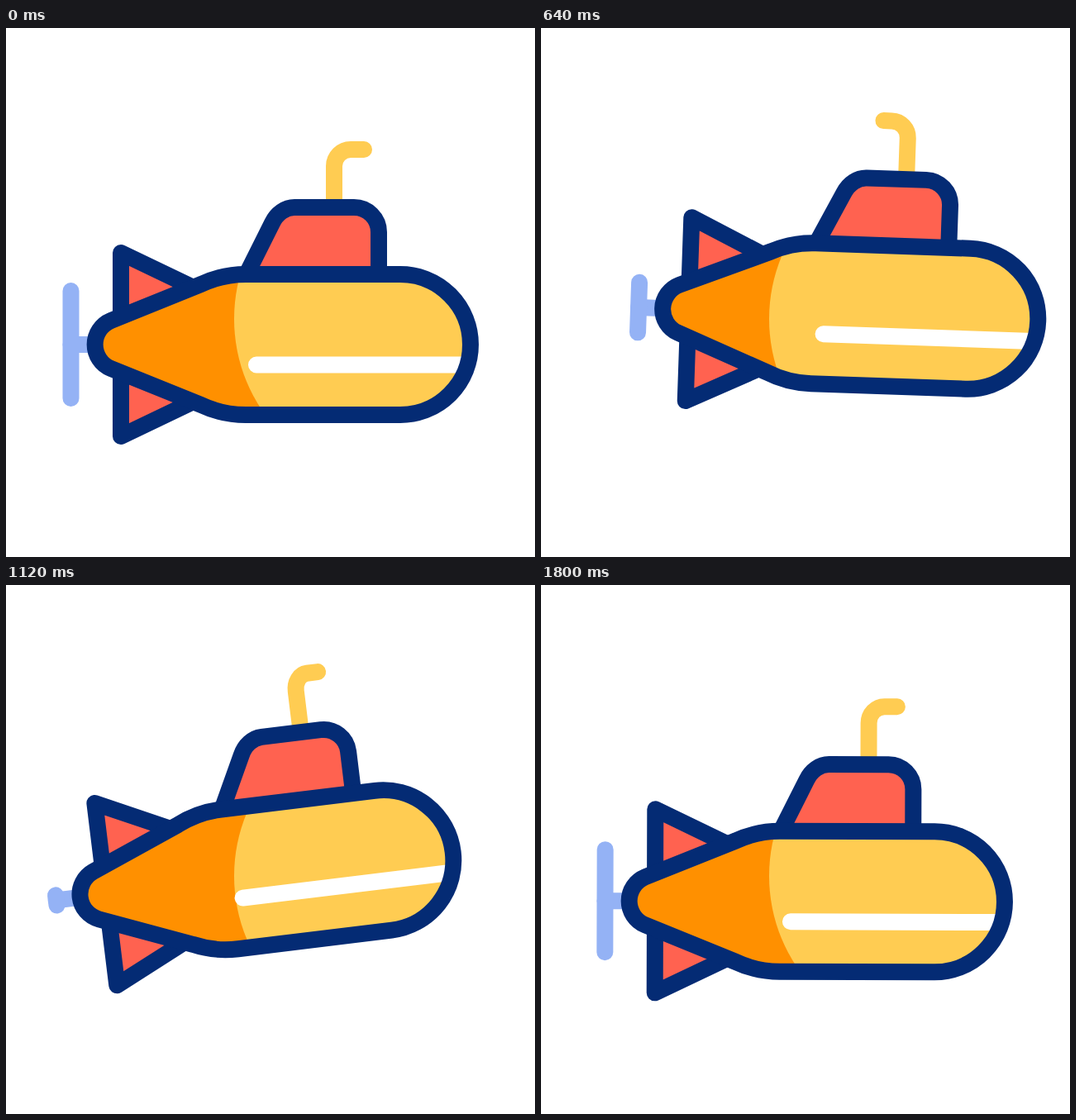
These frames come from a looping animation (640 px wide and 640 px high, 1.84 s). An HTML page without scripts:

```html
<!DOCTYPE html>
<html lang="en">
<head>
<meta charset="utf-8">
<title>Submarine</title>
<style>
@property --x { syntax: "<length>"; inherits: true; initial-value: 0px; }
@property --y { syntax: "<length>"; inherits: true; initial-value: 0px; }
@property --tilt { syntax: "<angle>"; inherits: true; initial-value: 0deg; }

html, body { margin: 0; width: 100%; height: 100%; overflow: hidden; background: #fff; }

svg {
  --loop: 1840ms cubic-bezier(.333, 0, .667, 1) infinite;
  display: block; width: 100%; height: 100%;
  animation: drift var(--loop), heave var(--loop), pitch var(--loop);
}

.sub, .still { transform-box: view-box; transform-origin: 320px 383px; }
.sub { transform: translate(var(--x), var(--y)) rotate(var(--tilt)); }
/* undoes the pose, so the light patch stays put on the stage */
.still { transform: rotate(calc(-1 * var(--tilt))) translate(calc(-1 * var(--x)), calc(-1 * var(--y))); }

.line { fill: none; stroke-width: 20; stroke-linecap: round; stroke-linejoin: round; }
.navy { stroke: #042b74; }
.red { fill: #ff6250; }
.blue { stroke: #94b2f5; }
.gold { stroke: #ffcc52; }
.white { stroke: #fff; }
.blades { animation: spin var(--loop); }
.scope { animation: look var(--loop); }

@keyframes drift {
  0% { --x: 0px; animation-timing-function: cubic-bezier(.333, 0, .667, .665); }
  23.91% { --x: 30.6px; animation-timing-function: cubic-bezier(.333, .615, .667, 1); }
  36.96% { --x: 39.7px; animation-timing-function: cubic-bezier(.333, 0, .667, .252); }
  52.17% { --x: 16px; animation-timing-function: cubic-bezier(.333, .287, .667, .698); }
  60.87% { --x: -19.3px; animation-timing-function: cubic-bezier(.333, .65, .667, 1); }
  75.54% { --x: -47px; }
  100% { --x: 0px; }
}
@keyframes heave {
  0% { --y: 0px; }
  18.75% { --y: 27px; animation-timing-function: cubic-bezier(.333, 0, .667, .345); }
  23.91% { --y: 18.3px; animation-timing-function: cubic-bezier(.333, .219, .667, .805); }
  34.78% { --y: -36.5px; animation-timing-function: cubic-bezier(.333, .97, .667, 1); }
  48.91% { --y: -50.8px; animation-timing-function: cubic-bezier(.333, 0, .667, .632); }
  60.87% { --y: -30.9px; animation-timing-function: cubic-bezier(.333, .51, .667, .795); }
  78.26% { --y: -10.1px; animation-timing-function: cubic-bezier(.333, .528, .667, 1); }
  100% { --y: 0px; }
}
@keyframes pitch {
  0% { --tilt: 0deg; }
  18.48% { --tilt: 9.4deg; animation-timing-function: cubic-bezier(.333, 0, .667, .24); }
  23.91% { --tilt: 8.3deg; animation-timing-function: cubic-bezier(.333, .265, .667, .577); }
  34.78% { --tilt: 2deg; animation-timing-function: cubic-bezier(.333, .287, .667, 1); }
  50% { --tilt: -11deg; animation-timing-function: cubic-bezier(.333, 0, .667, .25); }
  60.87% { --tilt: -7deg; animation-timing-function: cubic-bezier(.333, .29, .667, 1); }
  76.09% { --tilt: 7.2deg; }
  100% { --tilt: 0deg; }
}
@keyframes spin {
  0%, 50%, 100% { d: path("M78.5 318V448"); }
  25%, 75% { d: path("M78.5 463V303"); }
}
@keyframes look {
  0%, 12%, 56.52%, 100% { d: path("M397 220V167C397 156 406 147 417 147H433"); }
  34.78%, 78.26% { d: path("M397 220V167C397 156 388 147 377 147H367"); }
}
</style>
</head>
<body>
<svg viewBox="0 0 640 640">
  <defs>
    <path id="hull" d="M477 298A85 85 0 0 1 477 468H290C271 468 253 464 236 456L127 412A31.4 31.4 0 0 1 127 354L236 310C253 302 271 298 290 298Z"/>
    <path id="fin" d="M139 272L260 330L139 383Z"/>
    <clipPath id="inside"><use href="#hull"/></clipPath>
  </defs>
  <g class="sub">
    <path class="line gold scope" d="M397 220V167C397 156 406 147 417 147H433"/>
    <path class="line blue" d="M78.5 383H110"/>
    <path class="line blue blades" d="M78.5 318V448"/>
    <g class="line navy">
      <use class="red" href="#fin"/>
      <use class="red" href="#fin" transform="matrix(1 0 0 -1 0 766)"/>
      <path class="red" stroke-linecap="butt" d="M291 298L322 236C327.500 224.500 338 217 349 217H421A30 30 0 0 1 451 247V298"/>
    </g>
    <g clip-path="url(#inside)">
      <use href="#hull" fill="#ff9000"/>
      <circle class="still" cx="474" cy="352" r="198" fill="#ffcc52"/>
      <path class="line white" d="M303 407.500H600"/>
    </g>
    <use class="line navy" href="#hull"/>
  </g>
</svg>
</body>
</html>
```
